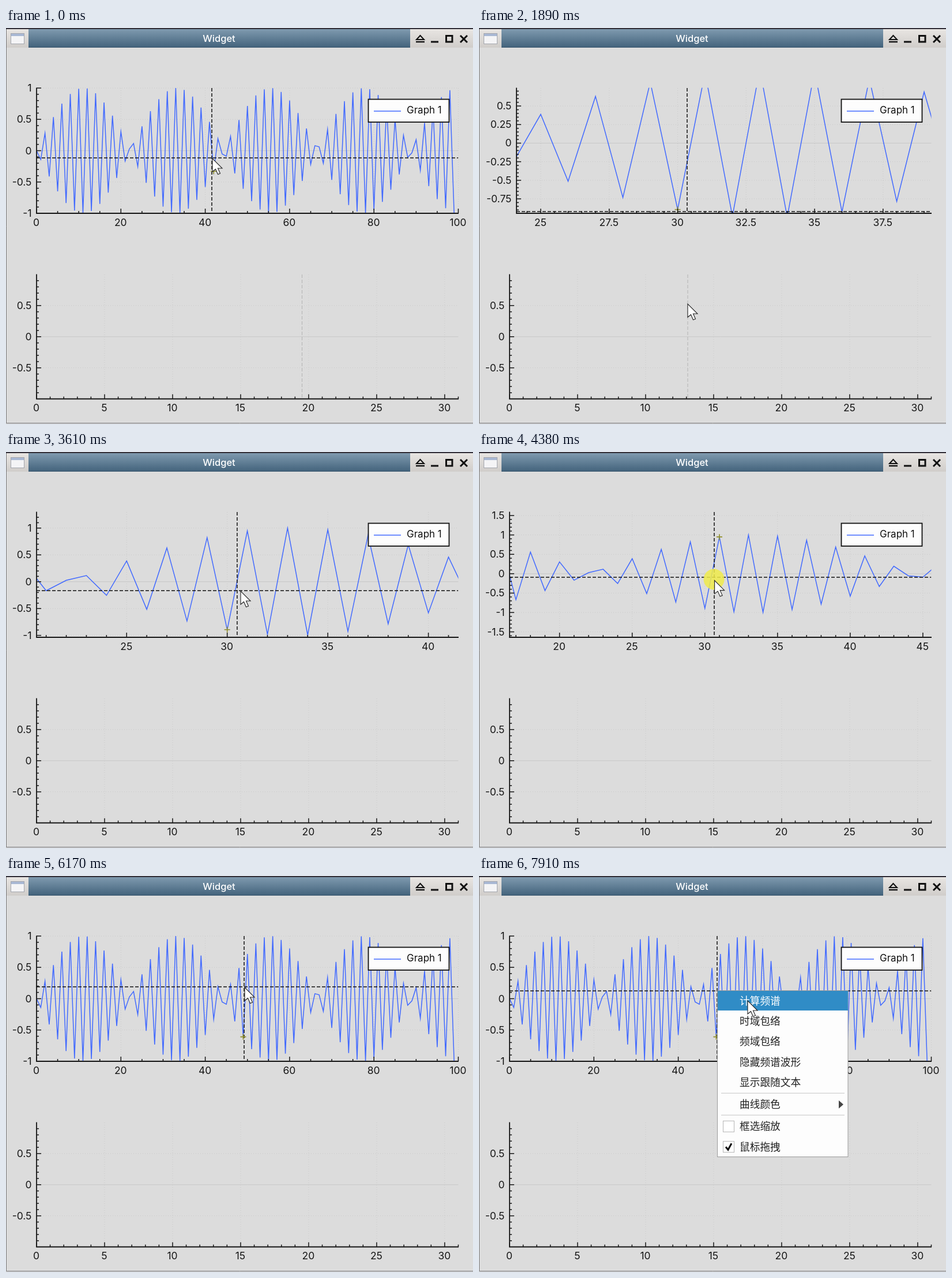
An HTML page with a canvas that plays this animation: 810 by 686 pixels, repeating every 7990 ms.

```html
<!DOCTYPE html>
<html lang="zh">
<head>
<meta charset="utf-8">
<title>Widget</title>
<style>
html, body { margin: 0; width: 100%; height: 100%; overflow: hidden; background: #dcdcdc; }
canvas { display: block; }
</style>
</head>
<body>
<canvas id="stage" width="810" height="686"></canvas>
<script>
const ctx = document.getElementById('stage').getContext('2d');
const LOOP = 7990, TICK = 77, RIGHT = 784.5;
const FULL = [0, 100, -1, 1];
const INK = '#161616', BLUE = '#426aff';

// Pointer moves: start, end, target x, target y. It rests in between.
const moves = [[150, 320, 229, 132], [400, 860, 338, 313], [1030, 1190, 341, 206],
  [1270, 1430, 362, 478], [1890, 2200, 397, 247], [2200, 2510, 456, 317], [2510, 2583, 435, 296],
  [2583, 2660, 435, 266], [2660, 2740, 407, 241], [4080, 4840, 411, 195], [6010, 6170, 414, 193],
  [6550, 6800, 414, 200], [7050, 7510, 466, 216]];

const boxZoom = [320, 1030], reset = 6010;
const pans = [[2200, 2660], [4080, 4840]];
const wheelTurns = [2740, 3130, 3680, 4080];
const menus = [{ open: 1190, close: 1660, x: 341, y: 206 }, { open: 7050, close: LOOP, x: 413, y: 198 }];
const clicks = [[7050, 7130], [7760, 7910]];
// While these last, the crosshair keeps its plot coordinates.
const holds = [[1030, 1190], [1190, 1890], [2740, 4080], [7050, LOOP]];

const menuItems = ['计算频谱', '时域包络', '频域包络', '隐藏频谱波形',
  '显示跟随文本', '曲线颜色', '框选缩放', '鼠标拖拽'];

const clamp = (v, lo, hi) => Math.max(lo, Math.min(hi, v));
const during = (t, [a, b]) => t >= a && t < b;
const signal = n => -Math.sin(3 * n);

function pointerAt(t) {
  let x = 358, y = 226;
  for (const [start, end, tx, ty] of moves) {
    if (t < start) break;
    const steps = Math.round((end - start) / TICK);
    const f = Math.min(1, Math.floor(steps * (t - start) / (end - start) + .1) / steps);
    x += (tx - x) * f;
    y += (ty - y) * f;
  }
  return [x, y];
}

function ticks(lo, hi) {
  const raw = (hi - lo) / 5, mag = 10 ** Math.floor(Math.log10(raw)), m = raw / mag;
  const nice = [1, 2, 2.5, 5, 10].reduce((a, b) => Math.abs(b - m) < Math.abs(a - m) ? b : a);
  const step = nice * mag, parts = nice === 2 ? 4 : 5, sub = step / parts, list = [];
  for (let i = Math.ceil(lo / sub - 1e-6); i <= hi / sub + 1e-6; i++)
    list.push({ value: i * sub, major: i % parts === 0 });
  return { step, list };
}

// px, py map plot coordinates to pixels; ux, uy map back.
function makeAxes([x0, x1, y0, y1], top = 104, bottom = 321) {
  const tx = ticks(x0, x1), ty = ticks(y0, y1);
  const left = Math.abs(ty.step - .25) < 1e-6 ? 65 : 53;
  const sx = (RIGHT - left) / (x1 - x0), sy = (bottom - top) / (y1 - y0);
  return {
    tx, ty, left, top, bottom,
    px: v => left + (v - x0) * sx,
    py: v => bottom - (v - y0) * sy,
    ux: p => x0 + (p - left) / sx,
    uy: p => y0 + (bottom - p) / sy
  };
}

function zoomOut(view, [x, y]) {
  const { ux, uy } = makeAxes(view);
  return view.map((v, i) => {
    const c = i < 2 ? ux(x) : uy(y);
    return c + (v - c) / .85;
  });
}

function pan(view, [x0, y0], [x1, y1]) {
  const { ux, uy } = makeAxes(view);
  return view.map((v, i) => v + (i < 2 ? ux(x0) - ux(x1) : uy(y0) - uy(y1)));
}

function viewAt(t) {
  if (t < boxZoom[1] || t >= reset) return FULL;
  const { ux, uy } = makeAxes(FULL);
  const panned = (view, [a, b]) => pan(view, pointerAt(a), pointerAt(clamp(t, a, b)));
  let view = panned([ux(229.4), ux(340.2), uy(315), uy(132)], pans[0]);
  for (const at of wheelTurns) if (t >= at) view = zoomOut(view, pointerAt(at));
  return panned(view, pans[1]);
}

// While panning, the crosshair is placed before the plot follows the pointer.
function crosshairAt(t, axes) {
  const hold = holds.find(h => during(t, h));
  const at = hold ? hold[0] - 1 : t;
  const drag = pans.find(p => during(at, p));
  const seen = makeAxes(viewAt(drag ? Math.max(drag[0], at - TICK) : at));
  const [x, y] = pointerAt(at);
  return [axes.px(seen.ux(x - 1)), axes.py(seen.uy(Math.min(y - 1, 318)))];
}

function line(points, color, width = 1, dash = []) {
  ctx.beginPath();
  points.forEach(([x, y]) => ctx.lineTo(x, y));
  ctx.strokeStyle = color;
  ctx.lineWidth = width;
  ctx.setLineDash(dash);
  ctx.stroke();
  ctx.setLineDash([]);
}

function shape(points, fill) {
  ctx.beginPath();
  points.forEach(([x, y]) => ctx.lineTo(x, y));
  ctx.closePath();
  ctx.fillStyle = fill;
  ctx.fill();
}

function box(x, y, w, h, fill, stroke, width = 1) {
  ctx.fillStyle = fill;
  ctx.fillRect(x, y, w, h);
  if (!stroke) return;
  ctx.strokeStyle = stroke;
  ctx.lineWidth = width;
  ctx.strokeRect(x, y, w, h);
}

function text(s, x, y, align, color, font) {
  ctx.font = font;
  ctx.fillStyle = color;
  ctx.textAlign = align;
  ctx.fillText(s, x, y);
}

function gradient(top, bottom) {
  const g = ctx.createLinearGradient(0, 2, 0, 34);
  g.addColorStop(0, top);
  g.addColorStop(1, bottom);
  return g;
}

function drawWindow() {
  box(0, 0, 810, 686, '#dcdcdc');
  box(0, 0, 810, 2, '#34313a');
  box(0, 2, 810, 32, gradient('#e8e5e2', '#d0cdca'));
  box(39, 2, 662, 32, gradient('#7f9aaf', '#42627b'));
  line([[39, 33.5], [701, 33.5]], '#38566d');
  box(8.5, 9.5, 23, 18, '#f4f4f6', '#a3a6ad');
  box(9, 10, 22, 4, '#a9b8d4');
  text('Widget', 369.5, 23.5, 'center', '#fff', '500 16.5px Inter, sans-serif');
  line([[718.5, 13], [712, 20], [725, 20], [718.5, 13], [712, 20]], '#111', 2);
  line([[711, 24], [726, 24]], '#111', 2.4);
  line([[737, 24], [750, 24]], '#111', 3);
  ctx.lineWidth = 3;
  ctx.strokeRect(763.5, 13.5, 10.5, 10.5);
  line([[788, 13], [800, 25]], '#111', 3);
  line([[800, 13], [788, 25]], '#111', 3);
  line([[.5, 2], [.5, 684.5], [810, 684.5]], '#77777a');
}

function drawGrid({ tx, ty, left, top, bottom, px, py }) {
  for (const { value, major } of tx.list)
    if (major && px(value) > left + 1) line([[px(value), top], [px(value), bottom]], '#c9c9c9', 1, [1, 3]);
  for (const { value, major } of ty.list)
    if (major) line([[left, py(value)], [RIGHT, py(value)]], '#c8c8c8', 1, value ? [1, 3] : []);
}

function drawAxes({ tx, ty, left, top, bottom, px, py }) {
  const font = '17.5px Inter, sans-serif';
  const label = v => String(+v.toFixed(2));
  line([[left, top - .5], [left, bottom], [RIGHT + .5, bottom]], INK, 1.8);
  for (const { value, major } of tx.list) {
    const x = px(value);
    line([[x, bottom], [x, bottom - (major ? 8 : 4)]], INK, 1.5);
    if (major) text(label(value), x - .5, bottom + 21.5, 'center', INK, font);
  }
  for (const { value, major } of ty.list) {
    const y = py(value);
    line([[left, y], [left + (major ? 8 : 4), y]], INK, 1.5);
    if (major) text(label(value), left - 8.5, y + 6, 'right', INK, font);
  }
}

function drawSignalPlot(t, [x, y]) {
  const axes = makeAxes(viewAt(t));
  const { left, top, bottom, px, py, ux } = axes;
  const [cx, cy] = crosshairAt(t, axes);
  drawGrid(axes);
  ctx.save();
  ctx.beginPath();
  ctx.rect(left, top - .5, RIGHT - left, bottom - top + 1);
  ctx.clip();
  const points = Array.from({ length: 100 }, (_, n) => [px(n), py(signal(n))]);
  line(points, BLUE, 1.5);
  line([[left, cy], [RIGHT, cy]], '#111', 1.5, [6, 3]);
  line([[cx, top], [cx, bottom]], '#111', 1.5, [6, 3]);
  const [mx, my] = points[clamp(Math.round(ux(cx)), 0, 99)];
  line([[mx - 5, my], [mx + 5, my]], '#92902a', 1.6);
  line([[mx, my - 5], [mx, my + 5]], '#92902a', 1.6);
  if (during(t, boxZoom))
    line([[229, 132], [x, 132], [x, y], [229, y], [229, 132]], '#8c8c8c', 1.2, [5, 3]);
  ctx.restore();
  drawAxes(axes);
  box(628.5, 123.5, 140, 39.5, '#fdfdfd', '#111', 1.8);
  line([[638, 144], [685, 144]], BLUE, 1.4);
  text('Graph 1', 695, 148, 'left', '#111', '17px Inter, sans-serif');
}

function drawSpectrumPlot(t, [x, y], menu) {
  const axes = makeAxes([0, 31, -.999, .999], 427, 642.5);
  drawGrid(axes);
  const hover = t < 320 ? 513.5 : y > axes.top && !menu ? x : 0;
  if (hover) line([[hover, axes.top], [hover, axes.bottom]], '#b2b2b2', 1, [6, 3]);
  drawAxes(axes);
}

function drawMenu({ x, y }, pointer, checked) {
  box(x + .5, y + .5, 226.5, 288, '#fdfdfd', '#9a9a9a');
  menuItems.forEach((name, i) => {
    const cy = y + 18 + 35.4 * i + 2.7 * clamp(i - 4, 0, 2);
    const hover = Math.abs(pointer[1] - cy) < 17.5 && pointer[0] > x + 2;
    if (hover) box(x + 1, cy - 17, 226, 34, '#308cc6');
    text(name, x + 39, cy + 6.5, 'left', hover ? '#fff' : '#222',
      '17.7px "Noto Sans CJK SC", "Noto Sans CJK", sans-serif');
    if (i === 5) {
      for (const dy of [-19.5, 18.5]) line([[x + 7, cy + dy], [x + 221, cy + dy]], '#c4c4c4');
      shape([[x + 211, cy - 7], [x + 219, cy], [x + 211, cy + 7]], '#444');
    }
    if (i > 5) box(x + 10.5, cy - 9.5, 19, 19, '#fff', '#b4b4b4');
    if (i === checked) line([[x + 15, cy], [x + 19, cy + 5], [x + 25, cy - 6]], '#111', 3);
  });
}

function drawPointer(t, [x, y]) {
  if ([boxZoom, ...pans, ...clicks].some(press => during(t, press))) {
    ctx.fillStyle = 'rgba(240,235,75,.85)';
    ctx.beginPath();
    ctx.arc(x - 1, y - 2, 18, 0, 7);
    ctx.fill();
  }
  const arrow = [[0, 0], [0, 23], [5.5, 18.5], [9.5, 27.5], [13.5, 26], [9.5, 17], [17, 17]];
  shape(arrow.map(([dx, dy]) => [x + dx, y + dy]), '#fff');
  ctx.strokeStyle = '#222';
  ctx.lineWidth = 1.1;
  ctx.stroke();
}

function render() {
  const t = performance.now() % LOOP;
  const pointer = pointerAt(t);
  const menu = menus.find(m => during(t, [m.open, m.close]));
  drawWindow();
  drawSpectrumPlot(t, pointer, menu);
  drawSignalPlot(t, pointer);
  if (menu) drawMenu(menu, pointer, t < 1600 ? 6 : 7);
  drawPointer(t, pointer);
  requestAnimationFrame(render);
}
render();
</script>
</body>
</html>
```
